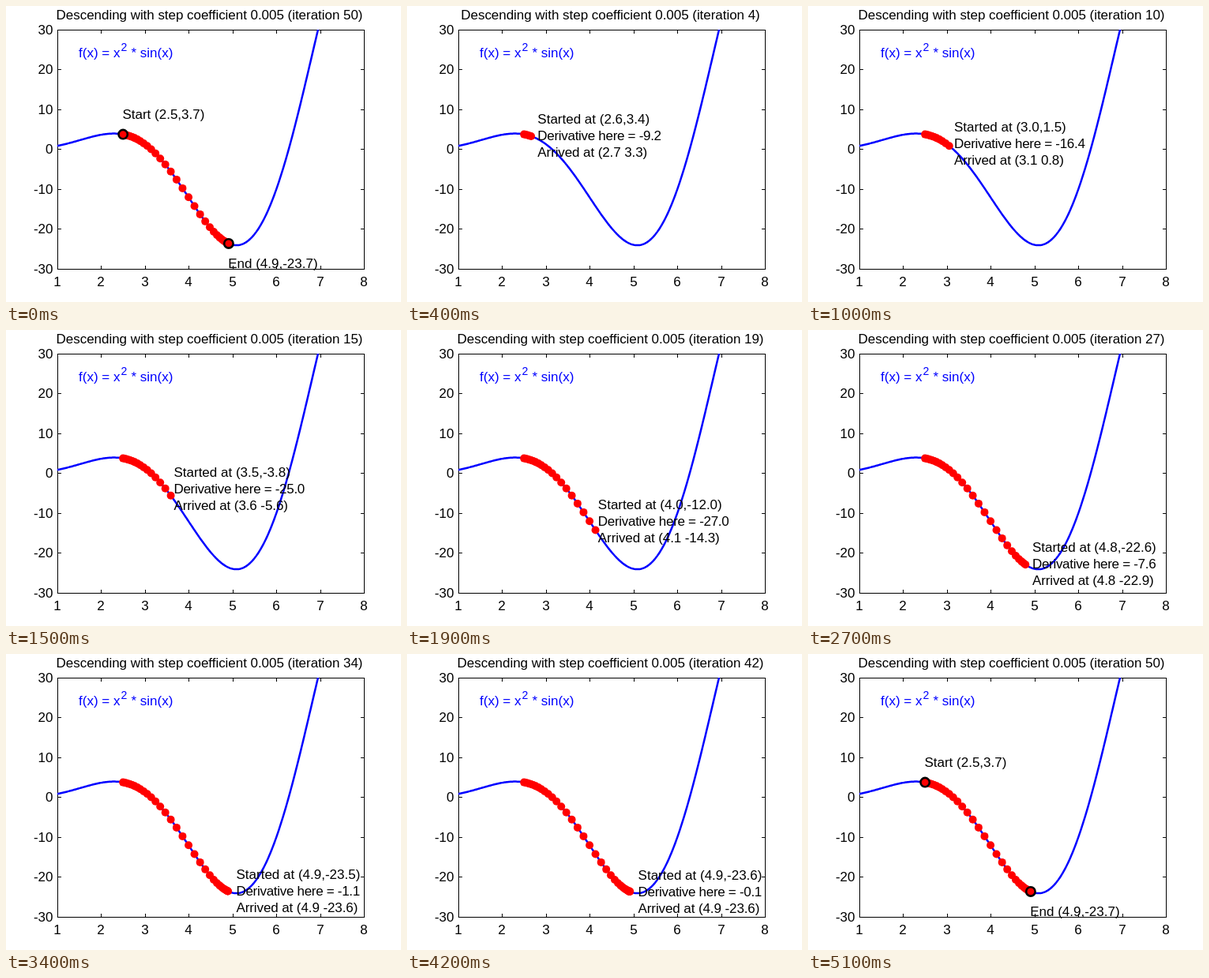
Recreate the animation shown at these times as an HTML page with a canvas. Size 500x375 px, loop 6100 ms.

```html
<!DOCTYPE html>
<html lang="en">
<head>
<meta charset="utf-8">
<title>Gradient descent</title>
<style>
  html, body { margin: 0; width: 100%; height: 100%; overflow: hidden; background: #fff; }
  canvas { display: block; }
</style>
</head>
<body>
<canvas id="stage" width="500" height="375"></canvas>
<script>
const ctx = document.getElementById('stage').getContext('2d');
const LOOP = 6100, FRAME = 100, ITERATIONS = 50, STEP = 0.005;
const LEFT = 65, RIGHT = 453, TOP = 30, BOTTOM = 333;

const f = x => x * x * Math.sin(x);
const slope = x => 2 * (x * Math.sin(x) + x * x * Math.cos(x));
const px = x => LEFT + (x - 1) / 7 * (RIGHT - LEFT);
const py = y => TOP + (30 - y) / 60 * (BOTTOM - TOP);
const fixed = v => v.toFixed(1);
const pair = (x, separator) => `(${fixed(x)}${separator}${fixed(f(x))})`;

const path = [2.5];
for (let i = 0; i < ITERATIONS; i++) path.push(path[i] - STEP * slope(path[i]));

function text(str, x, y, { align = 'left', color = '#000', size = 17, spacing = 0 } = {}) {
  ctx.font = `${size}px "Liberation Sans", Arial, sans-serif`;
  ctx.letterSpacing = spacing + 'px';
  ctx.textAlign = align;
  ctx.fillStyle = color;
  ctx.fillText(str, x, Math.round(y));
}

function circle(x, radius) {
  ctx.beginPath();
  ctx.arc(px(x), py(f(x)), radius, 0, 2 * Math.PI);
}

function drawAxes() {
  ctx.strokeStyle = '#000';
  ctx.lineWidth = 1;
  ctx.strokeRect(LEFT + 0.5, TOP + 0.5, RIGHT - LEFT, BOTTOM - TOP);
  ctx.fillStyle = '#000';
  for (let v = 1; v <= 8; v++) {
    const x = Math.round(px(v));
    ctx.fillRect(x, BOTTOM - 4, 1, 4);
    ctx.fillRect(x, TOP + 1, 1, 4);
    text(v, x, 355, { align: 'center' });
  }
  for (let v = -30; v <= 30; v += 10) {
    const y = Math.floor(py(v));
    ctx.fillRect(LEFT + 1, y, 4, 1);
    ctx.fillRect(RIGHT - 4, y, 4, 1);
    text(v, 59.5, y + 6, { align: 'right' });
  }
}

function drawCurve() {
  ctx.save();
  ctx.beginPath();
  ctx.rect(LEFT, TOP, RIGHT - LEFT, BOTTOM - TOP);
  ctx.clip();
  ctx.beginPath();
  for (let x = 1; x <= 7.1; x += 0.02) ctx.lineTo(px(x), py(f(x)));
  ctx.strokeStyle = '#00f';
  ctx.lineWidth = 2.5;
  ctx.stroke();
  ctx.restore();

  const color = '#00f';
  text('f(x) = x', 92, 65, { color });
  text('2', 145.5, 57, { color, size: 14 });
  text('* sin(x)', 158.5, 65, { color });
}

function drawStep(i) {
  const from = path[i - 1], x = px(from + 0.2) - 0.3, y = py(f(from)) + 6;
  text('Started at ' + pair(from, ','), x, y - 21);
  text('Derivative here = ' + fixed(slope(from)), x, y, { spacing: -0.3 });
  text('Arrived at ' + pair(path[i], ' '), x, y + 21, { spacing: -0.1 });
}

function drawEnds() {
  const ends = [['Start', path[0], 5], ['End', path[ITERATIONS], -5]];
  for (const [label, x, offset] of ends) {
    circle(x, 5.7);
    ctx.strokeStyle = '#000';
    ctx.lineWidth = 2.6;
    ctx.stroke();
    text(`${label} ${pair(x, ',')}`, px(x) - 0.7, py(f(x) + offset) + 6);
  }
}

function render(time) {
  const tick = Math.floor(time % LOOP / FRAME);
  const finished = tick === 0 || tick > ITERATIONS;
  const iteration = finished ? ITERATIONS : tick;

  ctx.fillStyle = '#fff';
  ctx.fillRect(0, 0, 500, 375);
  drawAxes();
  drawCurve();
  for (const x of path.slice(0, iteration + 1)) {
    circle(x, 5);
    ctx.fillStyle = '#f00';
    ctx.fill();
  }
  if (finished) drawEnds();
  else drawStep(iteration);
  text(`Descending with step coefficient ${STEP} (iteration ${iteration})`, 257.5, 17,
    { align: 'center', spacing: -0.04 });
}

const start = performance.now();
function loop() {
  render(performance.now() - start);
  requestAnimationFrame(loop);
}
loop();
</script>
</body>
</html>
```
